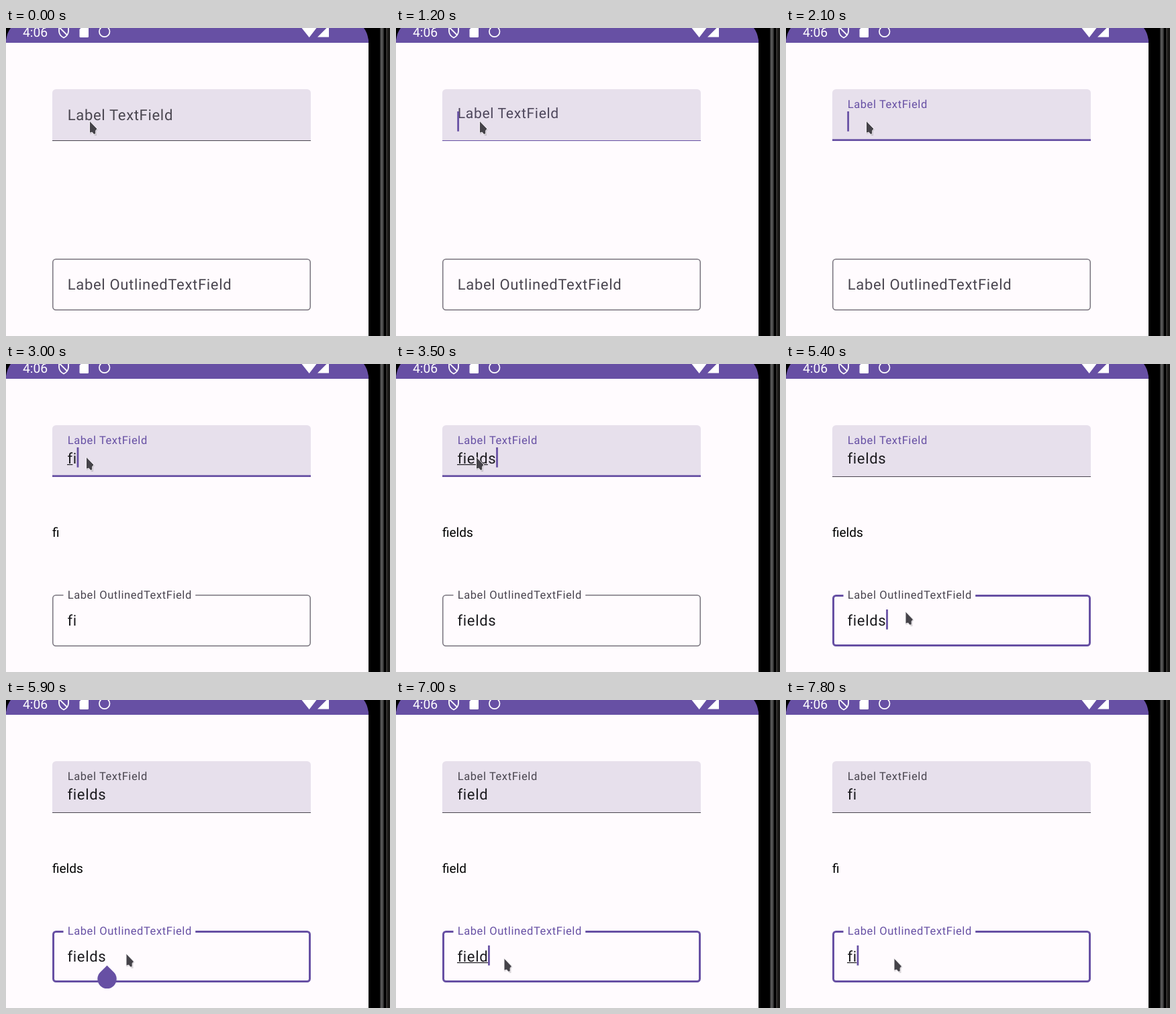
These frames come from a looping animation (572 by 458 pixels, 8 s). An HTML page:

```html
<!DOCTYPE html>
<html lang="en">
<head>
<meta charset="utf-8">
<title>Text fields</title>
<style>
  html, body { margin: 0; width: 100%; height: 100%; overflow: hidden; background: #fffbfe; }
  svg { display: block; width: 572px; height: 458px; }
  text { font-family: Roboto, sans-serif; white-space: pre; text-rendering: geometricPrecision; }
  .input { font-size: 22px; letter-spacing: .6875px; fill: #1c1b1f; }
  .accent { fill: #6750a4; }
</style>
</head>
<body>
<svg viewBox="0 0 572 458">
  <rect width="572" height="458" fill="#fffbfe"/>

  <!-- status bar -->
  <rect width="540" height="22" class="accent"/>
  <path d="M0 0H7Q2 6 0 18ZM540 0H533Q538 6 540 18Z"/>
  <g fill="#fff">
    <text x="25" y="13" font-size="19.25">4:06</text>
    <path d="M79 -2V5Q79.5 11.5 86 14.5Q92.5 11.5 93 5V-2M80.5 0L91.5 11" fill="none" stroke="#fff" stroke-width="1.8"/>
    <path d="M114.5 -3H121.5Q123 -3 123 -1.500V12.500Q123 14 121.5 14H111Q109.5 14 109.5 12.500V2Z"/>
    <circle cx="146.7" cy="5.3" r="7.800" fill="none" stroke="#fff" stroke-width="1.7"/>
    <path d="M440.5 0Q452 -6 462.5 0L451.7 14ZM464 13.500H481V-3.500Z"/>
  </g>

  <!-- phone edge -->
  <rect x="540" width="32" height="458"/>
  <rect x="557" width="6" height="458" fill="#343434"/>
  <rect x="558.5" width="2.5" height="458" fill="#5a5a5a"/>
  <rect x="566" width="6" height="458" fill="#191816"/>
  <rect x="566.5" width="1.5" height="458" fill="#3c3a38"/>

  <!-- filled field -->
  <path d="M69 168V96.500A5.500 5.500 0 0 1 74.500 91H448.500A5.500 5.500 0 0 1 454 96.500V168Z" fill="#e7e0ec"/>
  <rect id="line" x="69" width="385"/>
  <text id="label1" x="91.7">Label TextField</text>
  <text id="input1" class="input" x="91.5" y="147.7"></text>
  <rect id="under1" x="91" y="149" height="1.2" fill="#1c1b1f"/>
  <rect id="caret1" class="accent" y="124" width="2.75" height="29.7"/>

  <text id="plain" x="69" y="257" font-size="19"></text>

  <!-- outlined field -->
  <path id="border" fill="none"/>
  <text id="label2" x="91.7">Label OutlinedTextField</text>
  <text id="input2" class="input" x="91.5" y="388.7"></text>
  <rect id="under2" x="91" y="390" height="1.2" fill="#1c1b1f"/>
  <rect id="caret2" class="accent" y="365" width="2.75" height="29.7"/>
  <path id="handle" class="accent" d="M0 0L10.070 10.070A14.240 14.240 0 1 1 -10.070 10.070Z"/>

  <g id="mouse">
    <path d="M1 2V20L5 18 8 22H11V15L13 13Z" opacity=".15"/>
    <path d="M.5 0V18.300L4.300 17 6.500 20H9.700V14.500L12 12Z" fill="#454349" stroke="#f4f0f5"/>
  </g>
</svg>
<script>
const LOOP = 8000, STEP = 100, LEFT = 91, WORD = 'fields';
const GREY = [73, 69, 79], PURPLE = [103, 80, 164];
const $ = id => document.getElementById(id);

// The story, in ms
const TAP_TOP = 1200, TYPE = 2800, TYPED = 3500, TAP_BOTTOM = 5400, ERASE = 6900, ERASED = 7600;
const KEY = 125, MARK_LAG = 200, BLINK = 500;

// Pointer moves: start, duration, dx, dy
const HOME = [124, 138];
const MOVES = [
  [1700, 400, -5, 0],
  [4400, 100, 15.5, 73],
  [4500, 300, 43, 157],
  [5700, 200, 1, 9],
  [6700, 200, -18, 7]
];

const clamp = (v, low, high) => Math.min(high, Math.max(low, v));
const mix = (a, b, p) => a + (b - a) * p;
const ramp = (t, start, length) => clamp((t - start) / length, 0, 1);
const ease = p => p * p * (3 - 2 * p);
const tone = p => `rgb(${GREY.map((c, i) => Math.round(mix(c, PURPLE[i], p)))})`;
const show = (el, on) => { el.style.display = on ? '' : 'none'; };

function set(el, attrs) {
  for (const key in attrs) el.setAttribute(key, attrs[key]);
}

const typed = t => clamp(Math.floor((t - TYPE) / KEY) + 1, 0, WORD.length);

// Key presses speed up slightly while erasing.
function erased(t) {
  return t < ERASE ? 0 : 1 + Math.floor(3 * ramp(t, ERASE, ERASED - ERASE) ** 1.25);
}

function marked(t, length) {
  if (t < TAP_BOTTOM) return typed(t - MARK_LAG);
  return t > ERASE ? length : 0;
}

// Solid while keys are pressed, blinking otherwise.
function caretOn(t) {
  if (t >= ERASE || (t >= 2100 && t < TYPED)) return true;
  const since = [TAP_BOTTOM, TYPED, TAP_TOP].find(start => start <= t);
  return Math.floor((t - since) / BLINK) % 2 === 0;
}

function pointer(t) {
  return MOVES.reduce(([x, y], [start, length, dx, dy]) => {
    const p = ramp(t, start, length);
    return [x + dx * p, y + dy * p];
  }, HOME);
}

function widthOf(el, count) {
  return count ? el.getSubStringLength(0, count) : 0;
}

function drawLabel(el, p, tint, low, high) {
  set(el, { y: mix(low, high, p), fill: tone(tint) });
  el.style.fontSize = mix(22, 16.5, p) + 'px';
  el.style.letterSpacing = mix(.6875, .59, p) + 'px';
}

function drawInput(n, word, marks, focused, caret) {
  const input = $('input' + n), under = $('under' + n), bar = $('caret' + n);
  input.textContent = word;
  show(under, focused && marks);
  show(bar, focused && caret);
  if (!focused) return;
  set(under, { width: widthOf(input, marks) });
  set(bar, { x: LEFT + .2 + widthOf(input, word.length) });
}

function drawBorder(p, focused) {
  const w = focused ? 3 : 1.5, h = w / 2, r = 5.5 - h;
  const l = 69 + h, t = 343 + h, right = 454 - h, b = 420 - h;
  const start = LEFT - 5.5;
  const end = mix(start, LEFT + $('label2').getComputedTextLength() + 6, p);
  const arc = (x, y) => `a${r} ${r} 0 0 1 ${x} ${y}`;
  set($('border'), {
    d: `M${end} ${t}H${right - r}${arc(r, r)}V${b - r}${arc(-r, r)}` +
       `H${l + r}${arc(-r, -r)}V${t + r}${arc(r, -r)}H${start}`,
    stroke: focused ? '#6750a4' : '#79747e',
    'stroke-width': w
  });
}

function draw(now) {
  const t = Math.floor(now % LOOP / STEP) * STEP;
  const top = t >= TAP_TOP && t < TAP_BOTTOM, bottom = t >= TAP_BOTTOM;
  const word = WORD.slice(0, typed(t) - erased(t));
  const marks = marked(t, word.length), caret = (top || bottom) && caretOn(t);

  const rise1 = ease(ramp(t, TAP_TOP - 50, 200)), rise2 = ease(ramp(t, TYPE - 50, 200));
  const swap = ease(ramp(t, TAP_BOTTOM, 150));
  drawLabel($('label1'), rise1, rise1 - swap, 136.7, 118.5);
  drawLabel($('label2'), rise2, swap, 388.7, 349.2);
  drawInput(1, word, marks, top, caret);
  drawInput(2, word, marks, bottom, caret);
  drawBorder(rise2, bottom);
  $('plain').textContent = word;

  const weight = top ? mix(1, 2.75, ramp(t, TAP_TOP, 200)) : 1;
  set($('line'), { y: 168 - weight, height: weight, fill: tone(top ? 1 : 0) });

  const tip = LEFT + 1.6 + widthOf($('input2'), word.length);
  show($('handle'), t > TAP_BOTTOM && t < ERASE);
  set($('handle'), { transform: `translate(${tip} 394.7)` });
  set($('mouse'), { transform: `translate(${pointer(t)})` });
}

const origin = performance.now();
function tick() {
  draw(performance.now() - origin);
  requestAnimationFrame(tick);
}
tick();
</script>
</body>
</html>
```
